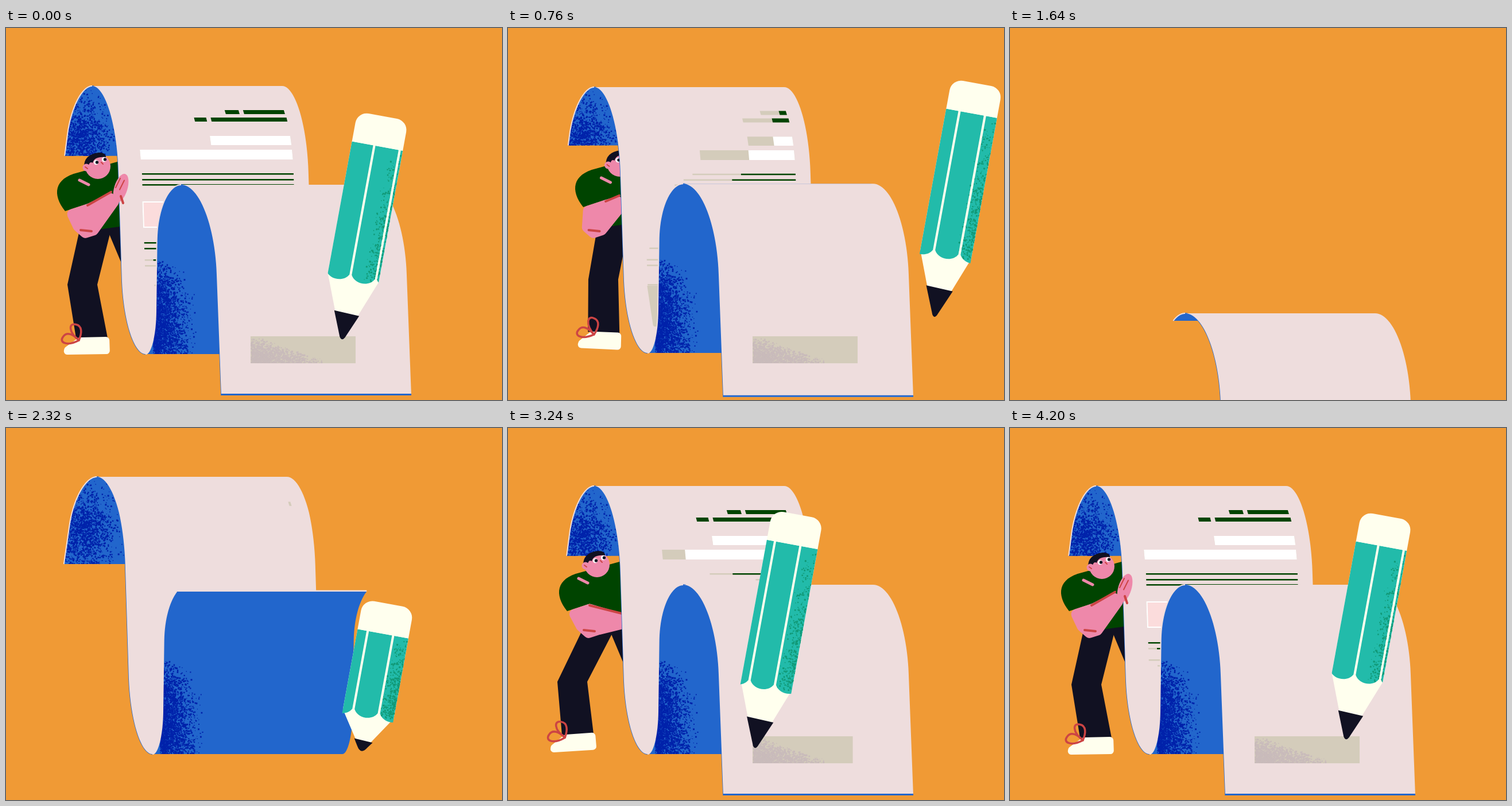
These frames come from a looping animation (864x648 px, 4.24 s). An HTML page with a canvas:

```html
<!DOCTYPE html>
<html lang="en">
<head>
<meta charset="utf-8">
<title>Paper and pencil</title>
<style>
html, body { margin: 0; width: 100%; height: 100%; overflow: hidden; background: #f09a35; }
canvas { display: block; width: 864px; height: 648px; }
</style>
</head>
<body>
<canvas id="stage" width="864" height="648"></canvas>
<script>
const ctx = document.getElementById('stage').getContext('2d');
const LOOP = 4240, STEP = 40, SHEET = 331, TILT = 10.4 * Math.PI / 180;
const C = {
  bg: '#f09a35', paper: '#eedddd', blue: '#2266cc', navy: '#0022aa', green: '#004400',
  skin: '#ee88aa', red: '#cc4444', ink: '#111122', teal: '#22bbaa', shade: '#119977',
  cream: '#ffffee', tan: '#d4ccbb', mauve: '#c9bbbb', blush: '#fbdcdc', white: '#ffffff'
};

// ---- helpers ----
const clamp = v => Math.max(0, Math.min(1, v));
const lerp = (a, b, p) => a + (b - a) * p;
const round = u => Math.sqrt(1 - (1 - clamp(u)) ** 2);

let seed = 7;
function rnd() {
  seed = (seed * 1664525 + 1013904223) >>> 0;
  return seed / 4294967296;
}
// n specks in a box, thinned by a density over (u, v) in 0..1.
function grain(n, x, y, w, h, density) {
  const out = [];
  while (out.length < n) {
    const u = rnd(), v = rnd();
    if (rnd() < density(u, v)) out.push([x + u * w, y + v * h, 1 + rnd() * 2]);
  }
  return out;
}

// Smooth track without overshoot; each key is [time, ...values].
function slope(keys, i, c) {
  if (i === 0 || i === keys.length - 1) return 0;
  const [p, k, n] = [keys[i - 1], keys[i], keys[i + 1]];
  const a = (k[c] - p[c]) / (k[0] - p[0]), b = (n[c] - k[c]) / (n[0] - k[0]);
  return a * b <= 0 ? 0 : 2 * a * b / (a + b);
}
function track(keys, t) {
  const last = keys.length - 1;
  if (t <= keys[0][0]) return keys[0].slice(1);
  if (t >= keys[last][0]) return keys[last].slice(1);
  let i = 0;
  while (t >= keys[i + 1][0]) i++;
  const a = keys[i], b = keys[i + 1], d = b[0] - a[0], u = (t - a[0]) / d;
  const h = u * u * (3 - 2 * u), g0 = u * (1 - u) * (1 - u) * d, g1 = u * u * (u - 1) * d;
  return a.slice(1).map((v, j) =>
    lerp(v, b[j + 1], h) + g0 * slope(keys, i, j + 1) + g1 * slope(keys, i + 1, j + 1));
}

function trace(pts) {
  ctx.beginPath();
  pts.forEach(([x, y], i) => i ? ctx.lineTo(x, y) : ctx.moveTo(x, y));
}
function poly(pts, color) {
  trace(pts);
  ctx.fillStyle = color;
  ctx.fill();
}
// Closed shape with softened corners.
function blob(pts, color, r) {
  const n = pts.length, a = pts[0], z = pts[n - 1];
  ctx.beginPath();
  ctx.moveTo((a[0] + z[0]) / 2, (a[1] + z[1]) / 2);
  pts.forEach((p, i) => {
    const q = pts[(i + 1) % n];
    ctx.arcTo(p[0], p[1], (p[0] + q[0]) / 2, (p[1] + q[1]) / 2, r);
  });
  ctx.fillStyle = color;
  ctx.fill();
}
function line(pts, color, w) {
  trace(pts);
  ctx.strokeStyle = color;
  ctx.lineWidth = w;
  ctx.stroke();
}
function oval(x, y, rx, ry, turn, color) {
  ctx.beginPath();
  ctx.ellipse(x, y, rx, ry, turn, 0, 7);
  ctx.fillStyle = color;
  ctx.fill();
}
const disc = (x, y, r, color) => oval(x, y, r, r, 0, color);
function specks(list, color, dx, dy) {
  ctx.fillStyle = color;
  for (const [x, y, r] of list) ctx.fillRect(x + dx, y + dy, r, r);
}

// ---- paper: four strips along one folded edge ----
// Each strip drifts from x0 to x1 and turns in a quarter ellipse at its ends:
// a wide over share p at the start, b wide over share q at the end.
const fold = (x0, x1, a, p, b, q) => v =>
  x0 + (x1 - x0 - a - b) * v + a * round(v / p) + b * (1 - round((1 - v) / q));
const EDGE = [
  fold(98, 150, 0, 1, 32, .55),
  fold(150, 243, 41, .32, 37, .28),
  fold(243, 305, 17, .25, 41, .33),
  fold(305, 375, 56, .42, 0, 1)
];

// time, drop, pull on the upper fold, squash, sway, tail and front along the strips
const LEAVE = [
  [0, 0, 0, 0, 0, .21, 4],
  [560, 0, 0, 0, 0, .21, 4],
  [1080, 0, 6, 1, 0, .883, 4],
  [1640, 224, 0, 0, 0, 2.956, 4],
  [1800, 480, 0, 0, 0, 3.3, 4]
];
const ENTER = [
  [1800, 620, 0, 0, 12, .013, 1.4],
  [2160, 0, -40, 0, 12, .013, 2.3],
  [2320, 0, -16, 0, 12, .013, 2.96],
  [2600, 0, 0, 0, 0, .21, 4]
];
function paperAt(t) {
  const [drop, pull, squash, sway, tail, front] = track(t < 1800 ? LEAVE : ENTER, t);
  const top = 101 + pull + drop;
  const levels = [top + 154, top, 568 - 6 * squash + drop, 273 - 5 * squash + drop, 640 + 8 * squash + drop];
  return { levels, sway, tail, front };
}
function point(k, v, p) {
  const x = EDGE[k](v);
  return [x + p.sway * clamp((x - 75) / 110), lerp(p.levels[k], p.levels[k + 1], v)];
}
function strip(k, p) {
  const a = clamp(p.tail - k), b = clamp(p.front - k), n = 60;
  if (a >= b) return null;
  return Array.from({ length: n + 1 }, (_, i) =>
    point(k, lerp(a, b, (1 - Math.cos(Math.PI * i / n)) / 2), p));
}
const sheet = pts => pts.concat(pts.map(([x, y]) => [x + SHEET, y]).reverse());

const backGrain = grain(1700, 95, 105, 110, 155, (u, v) => Math.exp(-9 * ((u - .3) ** 2 + (v - .58) ** 2)));
const foldGrain = grain(2500, 256, 385, 78, 185, (u, v) => (1 - u) ** 1.7 * clamp(v * 1.9 - u * .5));
const fieldGrain = grain(1300, 426, 537, 125, 47, (u, v) => clamp(v * 1.2 - u * 1.1 + .1));

function blueStrip(k, p, dots, dx, dy) {
  const pts = strip(k, p);
  if (!pts) return;
  ctx.save();
  poly(sheet(pts), C.blue);
  ctx.clip();
  specks(dots, C.navy, dx, dy);
  ctx.restore();
  line(pts, C.paper, 2);
  if (p.front > 2 && p.front < 3) {
    const [x, y] = pts[pts.length - 1];
    if (k === 2) line([[x, y - 1], [x + SHEET, y - 1]], C.paper, 2.5);
  }
}
function pinkStrip(k, p) {
  const pts = strip(k, p);
  if (!pts) return;
  line(pts, C.blue, 1.5);
  poly(sheet(pts), C.paper);
  if (k === 3 && p.front >= 4) {
    const [x, y] = pts[pts.length - 1];
    line([[x, y - 1.5], [x + SHEET, y - 1.5]], C.blue, 3);
  }
}

// ---- text rows: top, height, colour, then spans measured from the edge ----
const rule = y => [y, 2.5, C.green, [41, 305]];
const box = (y, h) => [y, h, C.blush, [40, 305]];
const ROWS = [
  [143, 7, C.green, [201, 225], [233, 304]],
  [156, 7, C.green, [144, 165], [173, 305]],
  [188, 16, C.white, [165, 305]],
  [212, 17, C.white, [40, 305]],
  ...[253, 263, 272].map(rule), box(302, 46),
  ...[373, 383, 403, 413, 447].map(rule), box(450, 70), rule(519)
];
function span(y, h, a, b, color, p) {
  const pt = (dx, yy) => {
    const [x, py] = point(1, (yy - 101) / 467, p);
    return [x + dx, py];
  };
  poly([pt(a, y), pt(b, y), pt(b, y + h), pt(a, y + h)], color);
}
// Rows grow leftwards one after another; a pale layer runs ahead of the colour.
function rows(t, p) {
  ROWS.forEach(([y, h, color, ...spans], i) => {
    const left = spans[0][0], right = spans[spans.length - 1][1];
    const start = 2300 + 160 * Math.min(i, 8) + 40 * Math.max(0, i - 8);
    for (const lag of [0, 80]) {
      let shown = clamp(((t < 1200 ? t + LOOP : t) - lag - start) / 530);
      if (t < 1200) shown = Math.min(shown, 1 - clamp((t - 620 - 15 * i + lag) / 250));
      const lim = lerp(right, left, shown);
      for (const [a, b] of spans) {
        const from = Math.max(a, lim);
        if (from >= b) continue;
        const framed = lag && color === C.blush;
        span(y, h, from, b, framed ? C.white : lag ? color : C.tan, p);
        if (framed) span(y + 2, h - 4, from + 2, b - 2, color, p);
      }
    }
  });
}

function field(t, p) {
  if (t > 1800 && t < 2900) return;
  const w = t < 1800 ? 183 : 183 * (1 - (1 - clamp((t - 2900) / 480)) ** 2.5);
  const dy = t < 1800 ? Math.max(0, p.tail - .883) * 400 : 0;
  ctx.save();
  ctx.beginPath();
  ctx.rect(426, 537 + dy, w, 47);
  ctx.fillStyle = C.tan;
  ctx.fill();
  ctx.clip();
  specks(fieldGrain, C.mauve, 0, dy);
  ctx.restore();
}

// ---- man: torso offset, head, knee, ankle, foot turn, hand, elbow ----
const PUSH = [0, 0, 160, 241, 133, 447, 149, 540, 0, 200, 279, 138];
const UPRIGHT = [8, -7, 176, 237, 156, 445, 163, 540, 0, 189, 286, 127];
const LEAN = [0, 0, 155, 238, 112, 442, 121, 534, -3, 222, 330, 140];
const KICK = [141, -7, 300, 237, 229, 418, 190, 505, 13, 330, 290, 268];
const slide = (pose, d) => pose.map((v, i) => [0, 2, 4, 6, 9, 11].includes(i) ? v + d : v);

const MAN_OUT = [[60, ...PUSH], [440, ...UPRIGHT], [600, ...UPRIGHT], [1080, ...KICK], [1240, ...slide(KICK, 120)]];
const MAN_IN = [[2440, ...slide(LEAN, 190)], [2960, ...LEAN], [3280, ...LEAN], [3460, ...PUSH]];

function manAt(t) {
  const [tx, ty, hx, hy, kx, ky, ax, ay, turn, px, py, ex] = track(t < 1240 ? MAN_OUT : MAN_IN, t);
  return { tx, ty, turn, head: [hx, hy], knee: [kx, ky], ankle: [ax, ay], hand: [px, py], elbow: [ex, 346] };
}
function lobe(x, y, angle) {
  ctx.save();
  ctx.translate(x, y);
  ctx.rotate(angle);
  ctx.beginPath();
  ctx.moveTo(0, 0);
  ctx.bezierCurveTo(18, -16, 34, -12, 28, 0);
  ctx.bezierCurveTo(24, 10, 12, 8, 0, 0);
  ctx.stroke();
  ctx.restore();
}
function leg({ tx, ty, knee: [kx, ky], ankle: [ax, ay], turn }) {
  const hx = tx + 153, hy = ty + 357, a = turn * Math.PI / 180, kicked = clamp(turn / 13);
  const end = d => [ax + d * Math.cos(a), ay + d * Math.sin(a)];
  poly([[hx + 26, hy], [hx + 52, hy + 62], [hx + 56, hy - 20], [hx, hy - 20]], C.ink);
  poly([[hx - 26, hy], [kx - 26, ky], end(-27), end(28), [kx + 26, ky], [hx + 28, hy + 2], [hx + 44, hy - 14]], C.ink);
  ctx.save();
  ctx.translate(ax, ay);
  ctx.rotate(a);
  const toe = lerp(-50, -31, kicked), knot = lerp(-22, 0, kicked);
  blob([[-22, -1], [31, -2], [32, 28], [toe, 29], [toe + 3, 17]], C.cream, 6);
  ctx.strokeStyle = C.red;
  ctx.lineWidth = 3.5;
  lobe(knot, 4, -2.9);
  lobe(knot, 4, lerp(-1.75, -1.2, kicked));
  ctx.restore();
}
function head([x, y]) {
  ctx.save();
  ctx.translate(x, y);
  disc(0, 0, 22, C.skin);
  ctx.beginPath();
  ctx.moveTo(-24, 2);
  ctx.quadraticCurveTo(-25, -21, 2, -24);
  ctx.quadraticCurveTo(14, -24, 14, -16);
  ctx.quadraticCurveTo(-6, -18, -9, -6);
  ctx.quadraticCurveTo(-15, -10, -17, 2);
  ctx.fillStyle = C.ink;
  ctx.fill();
  disc(-20, 2, 6.5, C.skin);
  line([[-22, 1], [-18, 4]], C.red, 2);
  for (const [ex, ey] of [[-3, -7], [11, -12]]) {
    disc(ex, ey, 4.2, C.white);
    disc(ex + 1.5, ey, 2.7, C.ink);
  }
  line([[6, -7], [9, -4]], C.red, 2);
  ctx.restore();
}
function arm({ tx, ty, elbow: [ex, ey], hand: [px, py] }) {
  const len = Math.hypot(px - ex, py - ey), ux = (px - ex) / len, uy = (py - ey) / len;
  const wrist = d => [lerp(ex, px, .82) - uy * d, lerp(ey, py, .82) + ux * d];
  const cuff = [tx + 142, ty + 306];
  blob([[tx + 103, ty + 319], cuff, wrist(-8), wrist(15), [ex + 20, ey + 14], [ex - 2, ey + 21], [ex - 20, ey + 5]], C.skin, 9);
  oval(px, py, 11.5, 26, .3, C.skin);
  line([[cuff[0], cuff[1] + 3], wrist(-8)], C.red, 4);
  line([[ex - 8, ey + 6], [ex + 11, ey + 8]], C.red, 4);
  for (const d of [0, 7]) line([[px + d - 1, py - 17 + d / 2], [px + d - 9, py - 1 + d / 2]], C.red, 2);
  line([[px, py + 14], [px + 4, py + 26]], C.red, 4);
}
function body(m) {
  leg(m);
  ctx.save();
  ctx.translate(m.tx, m.ty);
  ctx.beginPath();
  ctx.moveTo(103, 319);
  ctx.bezierCurveTo(80, 290, 84, 262, 125, 252);
  for (const [x, y] of [[205, 230], [205, 345], [132, 355], [143, 306]]) ctx.lineTo(x, y);
  ctx.fillStyle = C.green;
  ctx.fill();
  ctx.restore();
  const [x, y] = m.head;
  line([[x - 32, y + 24], [x - 16, y + 32]], C.skin, 5);
  head(m.head);
}

// ---- pencil: time, tip x, tip y, growth, wear, roll ----
const PENCIL_OUT = [
  [0, 585, 543, 1, 1, .44], [480, 593, 532, 1, 0, .36], [600, 604, 524, 1, 0, .34], [1000, 970, 480, 1, 0, .16]
];
const PENCIL_IN = [
  [1900, 970, 568, 0, 0, .3], [2320, 619, 564, 0, 0, .2], [2900, 440, 546, 1, 0, .16],
  [3240, 430, 558, 1, 0, .16], [4200, 585, 543, 1, 1, .44]
];
const pencilGrain = grain(330, 16, 0, 28, 1, (u, v) => u * Math.min(1, v * 1.5));

function pencilAt(t) {
  const [x, y, grow, wear, roll] = track(t < 1000 ? PENCIL_OUT : PENCIL_IN, t);
  const strokes = clamp((t - 3240) / 960);
  const bob = 14 * Math.sin(strokes * Math.PI * 6) * Math.sin(strokes * Math.PI);
  return {
    x, roll, y: y + bob,
    lead: lerp(20, 51, grow) - 4 * wear,
    wood: lerp(47, 60, grow) + 3 * wear,
    shaft: lerp(142, 250, grow) - 17 * wear
  };
}
function pencil({ x, y, lead, wood, shaft, roll }) {
  const half = 45, n = lead + wood, top = -n - shaft, cap = top - 53;
  ctx.save();
  ctx.translate(x, y);
  ctx.rotate(TILT);

  ctx.beginPath();
  ctx.moveTo(-half, -n);
  ctx.arcTo(-half, cap, 0, cap, 20);
  ctx.arcTo(half, cap, half, top, 20);
  ctx.lineTo(half, -n);
  ctx.lineTo(4, -5);
  ctx.lineTo(-4, -5);
  ctx.fillStyle = C.cream;
  ctx.fill();

  ctx.save();
  ctx.beginPath();
  ctx.rect(-half, top, half * 2, shaft + 14);
  ctx.clip();
  ctx.beginPath();
  for (let k = -1; k < 3; k++) {
    const a = -half + half * (2 * roll + k) + 2, b = a + half - 4;
    ctx.moveTo(a, top);
    ctx.lineTo(a, -n - 4);
    ctx.bezierCurveTo(a + 8, -n + 11, b - 8, -n + 11, b, -n - 4);
    ctx.lineTo(b, top);
  }
  ctx.fillStyle = C.teal;
  ctx.fill();
  ctx.clip();
  ctx.fillStyle = C.shade;
  for (const [gx, gy, r] of pencilGrain) ctx.fillRect(gx, top + gy * shaft, r, r);
  ctx.restore();

  const w = half * lead / n + 3, r = lerp(9, 4, clamp((lead - 20) / 31));
  ctx.beginPath();
  ctx.moveTo(-w, -lead - 1);
  ctx.lineTo(w, -lead + 1);
  ctx.lineTo(r, -r);
  ctx.quadraticCurveTo(0, r * .7, -r, -r);
  ctx.fillStyle = C.ink;
  ctx.fill();
  ctx.restore();
}

// ---- scene ----
function draw(t) {
  ctx.fillStyle = C.bg;
  ctx.fillRect(0, 0, 864, 648);
  const p = paperAt(t);
  const seen = t < 1240 || t > 2440, handsOn = t < 600 || t > 3360;
  const m = manAt(t);

  ctx.lineCap = 'butt';
  blueStrip(0, p, backGrain, p.sway / 2, p.levels[1] - 101);
  ctx.lineCap = 'round';
  if (seen) {
    body(m);
    if (!handsOn) arm(m);
  }
  ctx.lineCap = 'butt';
  pinkStrip(1, p);
  if (t < 1200 || t > 2300) rows(t, p);
  ctx.lineCap = 'round';
  if (seen && handsOn) arm(m);
  ctx.lineCap = 'butt';
  blueStrip(2, p, foldGrain, p.sway, p.levels[2] - 568);
  pinkStrip(3, p);
  field(t, p);
  if (t < 1000 || t > 1900) pencil(pencilAt(t));
}

ctx.lineJoin = 'round';
const begin = performance.now();
function tick() {
  const t = (performance.now() - begin) % LOOP;
  draw(Math.floor(t / STEP) * STEP);
  requestAnimationFrame(tick);
}
tick();
</script>
</body>
</html>
```
